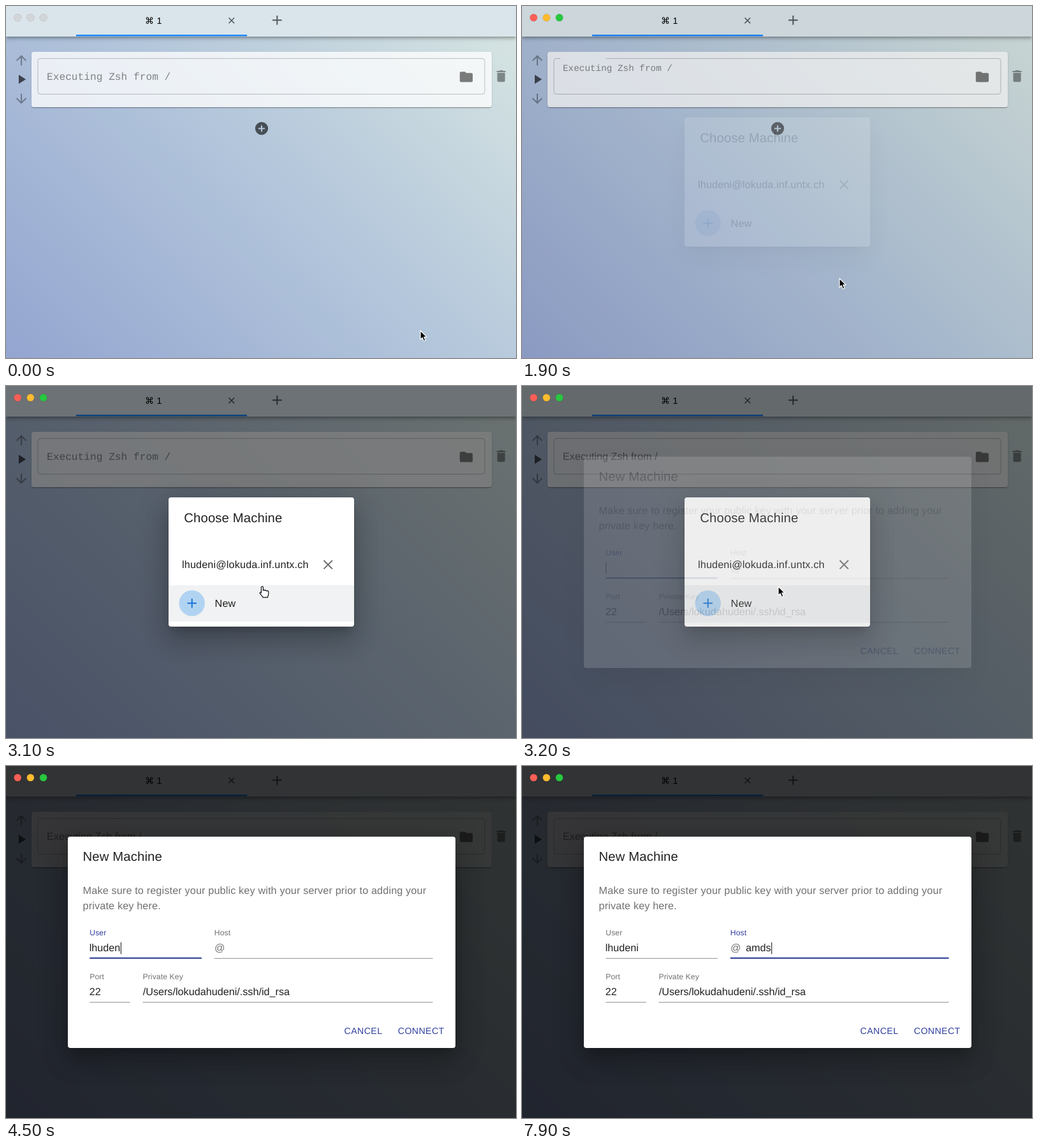
An HTML page that plays this animation: 800x553 px, repeating every 8000 ms.

```html
<!DOCTYPE html>
<html lang="en">
<head>
<meta charset="utf-8">
<title>New machine dialog</title>
<style>
  html, body { margin: 0; width: 100%; height: 100%; overflow: hidden; }
  #stage {
    position: relative; width: 800px; height: 553px; overflow: hidden;
    background: linear-gradient(45deg, #94a5d0, #b3c6db 52%, #d8e6e2);
    font-family: "Liberation Sans", Arial, sans-serif;
  }
  #stage div, #stage svg { position: absolute; }
  svg { left: 0; top: 0; width: 800px; height: 553px; }
  text { font-size: 16.2px; white-space: pre; text-rendering: geometricPrecision; }
  .bar {
    left: 0; top: 0; width: 800px; height: 47.5px; background: #dae5eb;
    box-shadow: 0 2px 4px -1px rgba(0,0,0,.2), 0 4px 5px rgba(0,0,0,.14), 0 1px 10px rgba(0,0,0,.12);
  }
  .card {
    left: 39.5px; top: 72px; width: 722px; height: 87px; border-radius: 4px;
    background: rgba(255,255,255,.76);
    box-shadow: 0 2px 1px -1px rgba(0,0,0,.2), 0 1px 1px rgba(0,0,0,.14), 0 1px 3px rgba(0,0,0,.12);
  }
  .dim { inset: 0; background: #000; }
  .panel {
    background: #fff; border-radius: 4px;
    box-shadow: 0 11px 15px -7px rgba(0,0,0,.2), 0 24px 38px 3px rgba(0,0,0,.14), 0 9px 46px 8px rgba(0,0,0,.12);
  }
  .choose { left: 255px; top: 175.3px; width: 291px; height: 202.5px; }
  .create { left: 97px; top: 110.5px; width: 607.5px; height: 332px; }
  .body { letter-spacing: .152px; }
  .title { font-size: 20.25px; letter-spacing: .152px; }
  .small { font-size: 12.15px; letter-spacing: .114px; }
  .button { font-size: 14.175px; letter-spacing: .405px; fill: #303f9f; }
  .ink { fill: #212121; }
  .grey { fill: #707070; }
</style>
</head>
<body>
<div id="stage">
  <div class="bar"></div>
  <div class="card"></div>
  <svg viewBox="0 0 800 553">
    <rect x="110" y="45" width="268" height="2.5" fill="#1a85fb"/>
    <text x="218" y="28" style="font: 14px 'DejaVu Sans', sans-serif">⌘</text>
    <text x="236.6" y="28" style="font-size: 14.2px">1</text>
    <g fill="none" stroke="#545a5e">
      <path d="M349.5 18.5l8.6 8.6m0-8.6l-8.6 8.6" stroke-width="1.5"/>
      <path d="M418 22.3h14.6m-7.3-7.3v14.6" stroke-width="2"/>
    </g>
    <g id="icons"></g>
    <path id="outline" fill="none"/>
    <text id="hint">Executing Zsh from /</text>
  </svg>

  <div class="dim" id="dim1"></div>
  <div id="dialog1">
    <div class="panel choose"></div>
    <svg viewBox="0 0 800 553">
      <rect id="hover" x="255" y="313" width="291" height="57" fill="#f1f2f3"/>
      <text class="title ink" x="279.3" y="214">Choose Machine</text>
      <text class="body ink" x="276" y="286">lhudeni@lokuda.inf.untx.ch</text>
      <path d="M498.5 274l13.4 13.4m0-13.4l-13.4 13.4" stroke="#707070" stroke-width="2"/>
      <circle cx="291.7" cy="341.2" r="20.25" fill="#b1d3f2"/>
      <path d="M284.5 341.2h14.4m-7.2-7.2v14.4" stroke="#1976d2" stroke-width="2"/>
      <text class="body ink" x="327.6" y="346.7">New</text>
    </svg>
  </div>

  <div class="dim" id="dim2"></div>
  <div id="dialog2">
    <div class="panel create"></div>
    <svg viewBox="0 0 800 553">
      <text class="title ink" x="120.6" y="149">New Machine</text>
      <text class="body grey" x="120.6" y="200.7">Make sure to register your public key with your server prior to adding your</text>
      <text class="body grey" x="120.6" y="225">private key here.</text>
      <g id="form"></g>
      <text class="grey" x="327" y="291">@</text>
      <rect id="caret" y="277" width="1.1" height="18.5" fill="#222"/>
      <text class="button" x="530.6" y="421.4">CANCEL</text>
      <text class="button" x="614.8" y="421.4">CONNECT</text>
    </svg>
  </div>

  <svg viewBox="0 0 800 553">
    <g id="lights"></g>
    <g id="pointer" stroke-linejoin="round">
      <path id="arrow" d="M0 0V14l3.1-2.9 2.3 5.4 2.6-1.1-2.3-5.3h4.3z" fill="#000" stroke="#fff" stroke-width="1.2"/>
      <path id="hand" fill="#fff" stroke="#111" stroke-width="1.2"
        d="M-1.6 9.5V1.4a1.5 1.5 0 0 1 3 0v5a1.5 1.5 0 0 1 2.9.3 1.5 1.5 0 0 1 2.8.6 1.4 1.4 0 0 1 2.6.8v4c0 2-1.2 2.8-1.2 5H1c-.5-2-3-3.600-4.600-6.200-1-1.700 1-2.600 2-.9z"/>
    </g>
  </svg>
</div>
<script>
const LOOP = 8000, STEP = 100;
const INDIGO = [48, 63, 159], GREY = [112, 112, 112];
const $ = id => document.getElementById(id);

function add(parent, tag, attrs, text = '') {
  const el = document.createElementNS('http://www.w3.org/2000/svg', tag);
  for (const k in attrs) el.setAttribute(k, attrs[k]);
  el.textContent = text;
  return parent.appendChild(el);
}
function set(el, attrs) {
  for (const k in attrs) el.setAttribute(k, attrs[k]);
}

// Easing of the form cubic-bezier(x1, 0, x2, 1)
function bezier(x1, x2) {
  return x => {
    if (x <= 0) return 0;
    if (x >= 1) return 1;
    let lo = 0, hi = 1, u;
    for (let i = 0; i < 24; i++) {
      u = (lo + hi) / 2;
      const at = 3 * u * (1 - u) ** 2 * x1 + 3 * u * u * (1 - u) * x2 + u ** 3;
      if (at < x) lo = u; else hi = u;
    }
    return 3 * u * u * (1 - u) + u ** 3;
  };
}
const inOut = bezier(.4, .2), out = bezier(0, .2);
const ramp = (t, start, ms, ease = out) => ease((t - start) / ms);
const mix = (a, b, p) => a + (b - a) * p;
const mixColor = (a, b, p) => `rgb(${a.map((v, i) => Math.round(mix(v, b[i], p)))})`;
const last = (table, t) => table.filter(row => row[0] <= t).pop();

// Icons on a 24 unit grid: x, y, opacity, path
[
  [11.9, 73, .35, 'M4 12l1.41 1.41L11 7.83V20h2V7.83l5.58 5.59L20 12l-8-8-8 8z'],
  [11.9, 103, .64, 'M8 5v14l11-7z'],
  [11.9, 133.600, .35, 'M20 12l-1.41-1.41L13 16.17V4h-2v12.17l-5.58-5.59L4 12l8 8 8-8z'],
  [764.5, 98, .4, 'M6 19c0 1.1.9 2 2 2h8c1.1 0 2-.9 2-2V7H6v12zM19 4h-3.5l-1-1h-5l-1 1H5v2h14V4z'],
  [709.8, 99.2, .5, 'M10 4H4c-1.100 0-2 .9-2 2v12c0 1.100.9 2 2 2h16c1.100 0 2-.9 2-2V8c0-1.100-.9-2-2-2h-8l-2-2z'],
  [388.800, 180.300, .61, 'M12 2a10 10 0 0 0 0 20 10 10 0 0 0 0-20zm5 11h-4v4h-2v-4H7v-2h4V7h2v4h4v2z'],
].forEach(([x, y, a, d]) => add($('icons'), 'path', {
  d, transform: `translate(${x} ${y}) scale(1.0125)`, 'fill-opacity': a, 'fill-rule': 'evenodd',
}));

const lights = ['#fe5f57', '#febc2e', '#28c840'].map((color, i) => ({
  color, el: add($('lights'), 'circle', { cx: 18.2 + i * 20.2, cy: 18.3, r: 5.8, 'stroke-width': .7 }),
}));

function field(label, x, y, width, textX, value) {
  const form = $('form');
  return {
    x, y, width, textX,
    label: add(form, 'text', { class: 'small grey', x, y: y - 36.2 }, label),
    text: add(form, 'text', { class: 'ink', x: textX, y: y - 11.300 }, value),
    rule: add(form, 'rect', { x, y: y - .5, width, height: 1, fill: '#8c8c8c' }),
    accent: add(form, 'rect', { y: y - 1.600, height: 2, fill: '#303f9f' }),
  };
}
const user = field('User', 131.3, 302.3, 175.5, 130.7, '');
const host = field('Host', 326.8, 302.3, 342.700, 351, '');
field('Port', 131.3, 371.2, 63.5, 130.7, '22');
field('Private Key', 214.5, 371.2, 455, 214.7, '/Users/lokudahudeni/.ssh/id_rsa');

function focusField(f, p, grow = p) {
  f.label.style.fill = mixColor(GREY, INDIGO, p);
  set(f.accent, { x: f.x + f.width * (1 - grow) / 2, width: f.width * grow, opacity: p > 0 ? 1 : 0 });
}

const FOCUS = 600, CHOOSE = 1855, CREATE = 3155, NEXT = 4800;
const userTyping = [[0, 0], [4100, 1], [4200, 2], [4300, 3], [4400, 4], [4500, 6], [4600, 7]];
const hostTyping = [[0, 0], [6300, 1], [7300, 2], [7500, 3], [7800, 4]];
const caretOn = [[0, 1], [3800, 0], [4100, 1], [5300, 0], [5700, 1], [6200, 0], [6300, 1], [6800, 0], [7300, 1]];
const moves = [[100, 300, 650, 510, 498, 428], [2400, 2900, 498, 428, 402, 315]];

function drawApp(t) {
  const active = t >= FOCUS;
  lights.forEach(l => set(l.el, {
    fill: active ? l.color : '#d3d6d9',
    stroke: active ? 'rgba(0,0,0,.12)' : '#bcbfc2',
  }));

  const focused = t >= FOCUS && t < CHOOSE;
  const up = ramp(t, FOCUS, 200) - ramp(t, CHOOSE, 200);
  const w = focused ? 2 : 1, l = 49.5 + w / 2, r = 751.5 - w / 2, top = 82 + w / 2, b = 139 - w / 2;
  set($('outline'), {
    d: `M${60 + 156 * up} ${top}H${r - 4}q4 0 4 4V${b - 4}q0 4-4 4H${l + 4}q-4 0-4-4V${top + 4}q0-4 4-4H60`,
    'stroke-width': w,
    stroke: focused ? '#4e5eb6' : 'rgba(0,0,0,.23)',
  });
  set($('hint'), {
    transform: `translate(64 ${mix(115.800, 86.5, up)}) scale(${mix(1, .75, up)})`,
    fill: focused ? '#5767b8' : 'rgba(0,0,0,.46)',
    'font-family': t < CREATE ? 'Liberation Mono, monospace' : 'Liberation Sans, sans-serif',
  });
}

function drawPointer(t) {
  let x = 650, y = 510;
  for (const [from, to, x0, y0, x1, y1] of moves) {
    if (t < from) continue;
    const p = ramp(t, from, to - from, inOut);
    x = mix(x0, x1, p);
    y = mix(y0, y1, p);
  }
  const over = t > CHOOSE && t < CREATE && y > 313 && y < 370;
  set($('pointer'), { transform: `translate(${x} ${y})`, opacity: t < 4100 ? 1 : 0 });
  set($('arrow'), { opacity: over ? 0 : 1 });
  set($('hand'), { opacity: over ? 1 : 0 });
  set($('hover'), { opacity: ramp(t, 2700, 150, inOut) });
}

function drawDialogs(t) {
  const a = ramp(t, CHOOSE, 225, inOut), b = ramp(t, CREATE, 225, inOut);
  $('dim1').style.opacity = .5 * a;
  $('dialog1').style.opacity = a;
  $('dim2').style.opacity = .55 * b;
  $('dialog2').style.opacity = b;

  user.text.textContent = 'lhudeni'.slice(0, last(userTyping, t)[1]);
  host.text.textContent = 'amds'.slice(0, last(hostTyping, t)[1]);
  const p = ramp(t, NEXT - 60, 200);
  focusField(user, 1 - p);
  focusField(host, p);

  const f = t < NEXT ? user : host;
  const width = f.text.textContent ? f.text.getComputedTextLength() : 0;
  set($('caret'), { x: f.textX + width + .5, opacity: last(caretOn, t)[1] });
}

// The screen refreshes ten times a second
function frame(now) {
  const t = Math.floor(now % LOOP / STEP) * STEP;
  drawApp(t);
  drawPointer(t);
  drawDialogs(t);
  requestAnimationFrame(frame);
}
frame(performance.now());
</script>
</body>
</html>
```
